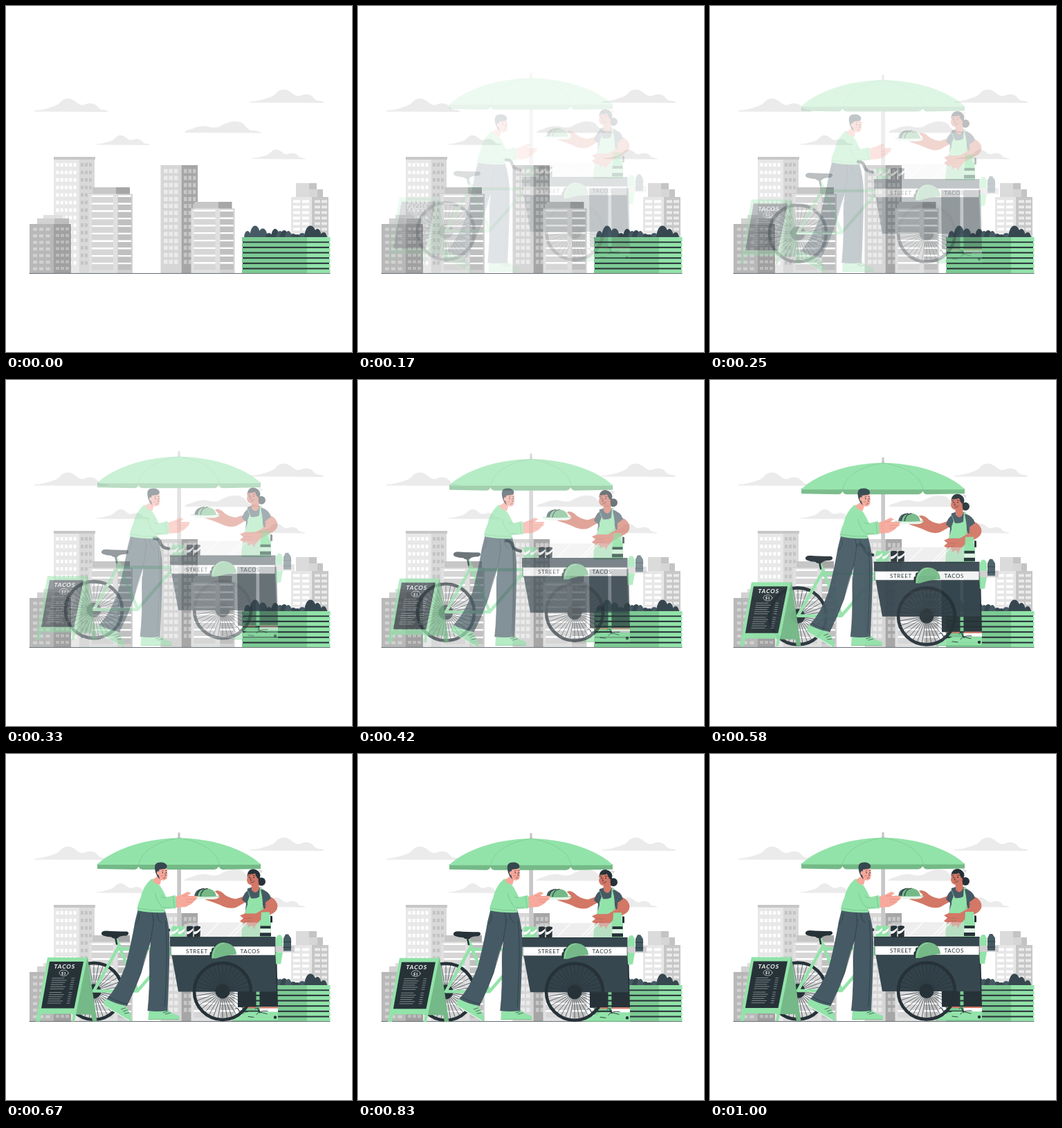
Animation of 500 by 500 pixels, one loop 1.04 s. Source, as an HTML page:

```html
<!DOCTYPE html>
<html lang="en">
<head>
<meta charset="utf-8">
<title>Street tacos</title>
<style>
html, body { margin: 0; height: 100%; overflow: hidden; background: #fff; }
svg { display: block; width: 100%; height: 100%; }
text { font-family: Lato, "Open Sans", sans-serif; }
.line { fill: none; stroke: #263238; stroke-width: .7; stroke-linecap: round; }
</style>
</head>
<body>
<svg id="stage" viewBox="0 0 500 500"></svg>
<script>
const GREEN = '#92e3a9', SHADE = '#74b987', DARK = '#263238', SLATE = '#455a64',
  SKIN = '#f7a99c', TAN = '#d37766', GRAY = '#c7c7c7';

const rect = (fill, x, y, x2, y2) =>
  `<rect x="${x}" y="${y}" width="${x2 - x}" height="${y2 - y}" fill="${fill}"/>`;
const path = (fill, d) => `<path fill="${fill}" d="${d}"/>`;
const line = (d, color = DARK, width = .7) =>
  `<path class="line" d="${d}" style="stroke:${color};stroke-width:${width}"/>`;
const dot = (fill, x, y, rx, ry = rx) =>
  `<ellipse cx="${x}" cy="${y}" rx="${rx}" ry="${ry}" fill="${fill}"/>`;
const label = (x, y, size, text, more = '') => `<text x="${x}" y="${y}" font-size="${size}" ${more}>${text}</text>`;
const move = (x, y, body, more = '') => `<g transform="translate(${x} ${y})${more}">${body}</g>`;
const range = (n, f) => Array.from({ length: n }, (_, i) => f(i)).join('');

// Grid of windows: column positions, size, first row, row pitch, row count
const windows = (fill, columns, w, h, y, pitch, rows) => path(fill, range(rows, r =>
  columns.map(x => `M${x} ${y + r * pitch}h${w}v${h}h${-w}z`).join('')));

const cloud = (x, y, scale) => move(x, y, path('#ebebeb',
  'M0 18Q12 18 23 14C34 11 37 8 40 4Q49-3 59 4C65 9 67 10 72 10Q82 5 90 10C95 15 95 17 102 17Q107 18 108 20L2 19.5Z'),
  ` scale(${scale})`);

// Striped tower with a roof box; its foot stands on the ground line
const striped = (x, y, rows) => move(x, y,
  rect(GRAY, 5, 0, 39, 10) + rect('#a6a6a6', 39, 0, 59, 10) +
  rect('#e0e0e0', 0, 9.5, 41, 386 - y) + rect('#d2d2d2', 41, 9.5, 63, 386 - y) +
  windows('#fff', [4], 31, 2.6, 11.5, 10.8, rows) + windows('#d6d6d6', [4], 31, 8.2, 14.1, 10.8, rows) +
  windows('#fff', [42], 19, 2.6, 11.5, 10.8, rows) + windows('#c0c0c0', [42], 19, 8.2, 14.1, 10.8, rows));

const city =
  cloud(40, 133, 1) + cloud(352, 120, 1) + cloud(130, 186.5, .72) + cloud(355, 207, .72) +
  path('#ebebeb', 'M258 183Q260 179 268 178C279 173 286 173 291 174C303 178 309 174 314 171Q332 163 343 170C350 178 351 180 357 180Q367 181 369 183.5Z') +
  rect('#e8e8e8', 69, 222, 105.5, 386) + rect('#d9d9d9', 105.5, 222, 128, 386) + rect(GRAY, 69, 218, 129, 222) +
  windows('#fff', [72.5, 78.7, 85, 91.2, 97.5], 4, 5, 227, 10.9, 14) +
  windows('#c4c4c4', [108, 114, 120], 4, 5, 227, 10.9, 14) +
  rect('#e0e0e0', 54, 302, 82, 308) + rect('#d2d2d2', 45, 307, 70, 315) + rect('#bdbdbd', 70, 307, 91, 315) +
  rect('#b8b8b8', 34, 315, 69, 386) + rect('#a0a0a0', 69, 315, 94, 386) +
  windows('#d2d2d2', [39, 48, 57.5], 6, 4.2, 320.5, 9.5, 7) +
  windows('#bdbdbd', [72, 79, 86], 5, 4.2, 320, 9.5, 7) +
  striped(120, 262, 10) +
  rect('#d6d6d6', 223.5, 230, 253.5, 386) + rect('#a6a6a6', 253.5, 230, 277, 386) +
  windows('#ebebeb', [228, 235.5, 243], 5.5, 6, 235.5, 10.1, 14) +
  windows('#c7c7c7', [257, 263.5, 270], 4.5, 6, 235.5, 10.1, 14) +
  striped(267.5, 283, 8) +
  rect('#dbdbdb', 419, 256, 438, 277) + rect('#c4c4c4', 438, 256, 449, 277) +
  rect('#d6d6d6', 438, 265, 450, 277) + rect('#c4c4c4', 450, 265, 458, 277) +
  rect('#e6e6e6', 412, 276, 442, 335) + rect(GRAY, 442, 276, 466, 335) +
  windows('#fff', [415, 428], 10, 4, 280.5, 8, 7) +
  windows('#ebebeb', [446, 456], 8, 4, 280.5, 8, 7) +
  line('M34 386.5H468');

// Produce heaps: centre, top, half width, shade
const heaps = [[349, 325, 5, 0], [371, 321.5, 7, 0], [360, 317.5, 8, 0], [380, 328, 5, 1], [389, 322, 6, 1],
  [396, 325, 6, 0], [402, 324, 6, 1], [415, 329, 6, 1], [408, 325, 5, 0], [428, 328, 6, 0],
  [421, 330, 4, 1], [450, 322, 6, 1], [459, 327, 5, 1], [440, 317.5, 9, 1]];
const crate =
  heaps.map(([x, top, w, d]) => dot(d ? '#37474f' : SLATE, x, 335, w, 335 - top)).join('') +
  rect(DARK, 342, 336, 467, 386) +
  range(7, i => {
    const y = i ? 334.6 + i * 7.65 : 334, end = i ? y + 5.6 : 340.4;
    return rect('#7cca93', 341, y, 435, Math.min(end, 386)) + rect(GREEN, 435, y, 468.5, Math.min(end, 386));
  });

const umbrella =
  rect(GRAY, 247.3, 155, 253, 264) + path(GRAY, 'M248 122L248.5 113H251.5L252 122Z') +
  path(SHADE, 'M132 158H368V165.5L313 166.5Q309 166 307.5 162Q305 166 301 166.5H197Q193 166 191.5 162Q190 166 186 166.5L132 165.5Z') +
  path(GREEN, 'M132 159.5C146 143 194 121 250 121S354 143 368 159.5Z') +
  line('M250 121C216 126 194 142 192 159M250 121C284 126 306 142 308 159', SHADE, .5);

const woman =
  path(DARK, 'M334 280H361.5V365.5H335ZM366 280H391L393 365.5H366.5Z') +
  rect('#fff', 367, 365, 393, 373) + rect(TAN, 343, 365, 361, 367) + rect(TAN, 367, 365, 393, 367) +
  path(GREEN, 'M327 385L333 379Q344 376 350 372H393V385Z') +
  line('M327 385H393', SHADE, 1) + dot(DARK, 389, 380, 2.2) +
  line('M331 368Q336 364 337 372Q341 368 342 373M360 368Q364 364 365 372L377 375M362 376Q365 370 378 371M364 366L367 374M350 379L358 380', DARK, .9) +
  // shirt and apron
  path(SLATE, 'M349 194L361 190Q374 194 382 207L375 221L373 266H342L346 226Z') +
  path(DARK, 'M382 233L385 234V243H382Z') +
  path(GREEN, 'M349 196L354 208Q361 209 366 206L367 191L370 193L371 218Q374 232 383 244V266H340Q341 238 349 217Z') +
  // head
  dot(DARK, 369, 184, 6) + dot(DARK, 358, 175, 9.5, 8.5) +
  path(TAN, 'M354 182L364 178L366 194Q361 204 355 196Z') +
  path(TAN, 'M350 171Q357 172 361 171L365 179Q364 189 356 189Q349 189 348 182Z') +
  path(DARK, 'M349 173Q351 165 359 166Q367 168 367 178L364 180Q361 176 360 172Q355 174 349 173Z') +
  path('#dcdcdc', 'M364 166L371 168L369 172Z') +
  dot(DARK, 352, 178, .8, 1) + dot(DARK, 358, 178, .8, 1) +
  line('M350 175.5L352 175M357 175L360 175.5M354 179L353 182H355M354 185Q357 186 359 183') +
  // arms
  path(TAN, 'M347 204L332 209Q319 207 313 200Q306 195 302 198L308 204L300 207L289 208L288 210L300 214L308 217Q323 225 333 221L349 212Z') +
  path(SLATE, 'M349 197Q344 200 341 210L348 216L352 205Z') +
  path(TAN, 'M375 207Q386 203 392 216Q394 224 387 229L367 240L360 248L359 253L356 247L349 250L350 246L343 245L338 241L343 237L338 233L345 230L361 230L375 222Z') +
  path(SLATE, 'M368 195Q380 197 383 208L372 216Z') +
  line('M344 237L356 237M344 242L355 241M369 223L377 217', '#a85b4f', .5) +
  // plate
  path(SLATE, 'M272 206Q273 195 283 194Q292 195 293 206Z') +
  path(SHADE, 'M276 206Q277 194.5 288 194Q296 195 298 206Z') +
  path(SHADE, 'M281 206Q282 194.5 293 194Q303 196 304 206Z') +
  line('M276 206Q277 195 286 194M281 206Q282 195 291 194', DARK, 1.2) +
  path('#e5f6ea', 'M267 205Q288 206.500 309 205Q306 209.500 299 209.500H277Q270 209.500 267 205Z') +
  line('M267 205Q288 206.500 309 205', SHADE, .5);

const wheel = x => move(x, 342.5,
  `<path class="line" d="${range(36, i => {
    const a = i * Math.PI / 18;
    return `M0 0L${(40 * Math.cos(a)).toFixed(1)} ${(40 * Math.sin(a)).toFixed(1)}`;
  })}"/><circle r="41" fill="none" stroke="${DARK}" stroke-width="4.6"/>` + dot(DARK, 0, 0, 10.5));

const can = (x, color) =>
  path(color, `M${x} 249Q${x + 5} 247 ${x + 9.5} 249L${x + 9} 264H${x + .5}Z`) +
  path('#fff', `M${x} 256Q${x + 4} 257 ${x + 9.5} 251V254Q${x + 5} 260 ${x + .3} 260Z`);

const cart =
  // bicycle
  wheel(127) +
  line('M127 342L164 276M158 264L190 341M127 342H190L243 281M161 281H240', GREEN, 4.5) +
  line('M158 264L160 274', DARK, 2.5) +
  path(DARK, 'M138 260Q137 255 145 255Q158 256 175 256Q180 259 174 262Q163 262 161 266Q155 267 152 264Q140 263 138 260Z') +
  line('M214 239Q222 239 223 246Q225 253 235 254', DARK, 4.5) +
  // condiments
  rect('#cfcfcf', 386, 276.5, 417, 286) + path(GREEN, 'M389 286H400L397 303H390Z') +
  path(GREEN, 'M390 277V266L393 261H397L400 266V277Z') + path(SLATE, 'M401 284V266L404 260H408L412 266V284Z') +
  line('M401 271H412M401 279H412', DARK, .8) +
  // counter top
  '<path fill="#dedede" opacity=".5" d="M283 243H367V264H241L263 243Z"/>' +
  '<path stroke="#fff" stroke-width="2" opacity=".6" d="M287 264L308 243M321 264L342 243M327 264L348 243"/>' +
  can(239.5, GREEN) + can(249, GREEN) + can(261, DARK) + can(271.5, DARK) +
  path(GREEN, 'M369 228H381L383 264H367Z') + rect(DARK, 367.5, 248, 382.5, 252) +
  rect('#e5f6ea', 367.3, 252, 382.7, 258) + rect(DARK, 367, 258, 383, 263) +
  // body
  path('#37474f', 'M239 288H389L391 343H249Z') + rect('#37474f', 237, 264, 389.5, 277.5) +
  line('M237 264.5H389', DARK, 1) +
  rect('#fff', 238.5, 277.5, 389, 290.5) + line('M238.5 277.5H389V290.5H238.5Z', DARK, .6) +
  path('rgb(38 50 56 / .22)', 'M270 342.5A43 43 0 0 1 356 342.5Z') +
  wheel(313) +
  label(260, 287.2, 8, 'STREET', `fill="${DARK}" letter-spacing=".65"`) +
  label(338.5, 287.2, 8, 'TACOS', `fill="${DARK}" letter-spacing=".6"`) +
  path(DARK, 'M294.5 290Q294 285 297 285Q296 279 301 279Q302 273 308 274Q312 269 318 272L328 278L300 295.5Q294 295 294.5 290Z') +
  path(SHADE, 'M297 295C297 279 306 271 316 272C327 273 333 281 333 289Q318 290 303 295Z') +
  line('M299 294C299 281 307 274 315 273', GREEN, 1);

const sign =
  path(SHADE, 'M112 294H118L131.5 386H125L123 376H96Z') +
  path(GREEN, 'M60 293.5H117.5L99 386H95L97 375H51L49 386H43Z') +
  path(DARK, 'M63 299.5H112L98.5 367H51Z') +
  label(0, 0, 8.2, 'TACOS', 'fill="#fff" font-weight="700" letter-spacing=".9" transform="translate(69 309.5) skewX(-10)"') +
  label(83.3, 318.3, 6, '$1', 'fill="#fff" font-weight="700" text-anchor="middle" font-style="italic"') +
  '<ellipse class="line" cx="83.5" cy="316" rx="6.5" ry="4.3" style="stroke:#fff;stroke-width:.6"/>' +
  range(12, i => {
    const y = 323.5 + i * 3.1 + (i > 5 ? 2 : 0), x = 67 - (y - 323) * .19;
    return line(`M${x} ${y}h${[17, 21, 19][i % 3]}M${x + 28} ${y}h4`, '#b8c0c3', .6);
  });

const man =
  path(GREEN, 'M145 353Q140 359 142 364L177 385Q181 387 181 382Q180 374 171 363Z') +
  line('M142 364L177 385', '#e5f6ea', 1.2) +
  path(GREEN, 'M206 369L205 384H249Q252 382 249 378Q240 376 233 369Z') + line('M206 383.5H249', SHADE, .8) +
  line('M166 369L172 367M169 372L175 370M171 375L177 374M227 374L233 372M230 376L237 374') +
  path(SLATE, 'M190 226L226 227L213 260Q203 282 195 316Q186 340 174 364Q157 361 145 354Q161 337 172 307Q181 272 186 242Z') +
  path(SLATE, 'M203 227H229.5Q236 248 236 272Q236 302 233 371Q218 373 204.5 371Q208 340 207 300Q207 284 210 256Z') +
  line('M213 239Q211 266 202 292L194 318Q186 341 174 364M207 284Q208 340 204.5 371M192 231Q193 241 187 246M211 230L213 241M218 230Q218 240 225 244M230 241Q234 280 229 365M148 351Q160 358 174 361', DARK, .6) +
  // arm and hands
  path(SKIN, 'M242 207L254 203L262 199L267 201L262 205L275 205Q278 206 274 208L276 209L271 213L267 217L259 221L243 222Z') +
  line('M260 210H273M260 214H270M255 205L262 205', '#d47f73', .5) +
  path(GREEN, 'M209 181Q216 179 219 187Q225 193 231 207L244 204Q247 213 245 223L229 224V229Q208 230 189 226Q189 219 194 208Q197 192 209 181Z') +
  line('M215 201Q217 213 226 222H238M231 207Q226 209 224 205M241 206L243 222M190 223Q209 227 229 226', SHADE, .7) +
  // head
  path(SKIN, 'M217 166L225 163L232 165L233 174L232 180Q229 184 224 182L222 189Q214 188 211 182L218 177Z') +
  path('#37474f', 'M216 172Q212 159 219 157Q229 155 232 161Q233 165 229 166L221 167L220 175L222 181Q218 178 216 172Z') +
  dot(SKIN, 219.5, 172, 2, 2.8) + dot(DARK, 226, 171.5, .7, 1) + dot(DARK, 231, 171.5, .7, 1) +
  dot('#ef8e82', 225, 176, 2, 1.5) +
  line('M225 169L227 168.5M230 168.5L232 168.5M229 172.5L231 175.5L229 176M227 179.5L230 178.5', DARK, .6);

document.getElementById('stage').innerHTML = city + crate +
  [['drop', umbrella], ['drop', woman], ['drop', cart], ['drop', sign], ['slide', man]]
    .map(([kind, body]) => `<g class="${kind}" opacity="0">${body}</g>`).join('');

// Cubic Bezier easing (.36, -.01, .5, 1.38), solved by bisection
const bezier = (s, a, b) => 3 * (1 - s) ** 2 * s * a + 3 * (1 - s) * s * s * b + s ** 3;
function ease(x) {
  if (x >= 1) return 1;
  let low = 0, high = 1;
  for (let i = 0; i < 30; i++) {
    const mid = (low + high) / 2;
    if (bezier(mid, .36, .5) < x) low = mid; else high = mid;
  }
  return bezier(low, -.01, 1.38);
}

const LOOP = 1040, RATE = 24, TRAVEL = 20;
const parts = [...document.querySelectorAll('.drop, .slide')];
function draw() {
  const step = Math.floor((performance.now() % LOOP) * RATE / 1000 + .1);
  const p = ease((step + 1) / RATE), shift = TRAVEL * (p - 1);
  for (const part of parts) {
    // The first step is still empty
    part.setAttribute('opacity', step ? Math.max(0, Math.min(1, p)) : 0);
    part.setAttribute('transform', part.matches('.slide') ? `translate(${shift} 0)` : `translate(0 ${shift})`);
  }
  requestAnimationFrame(draw);
}
draw();
</script>
</body>
</html>
```
